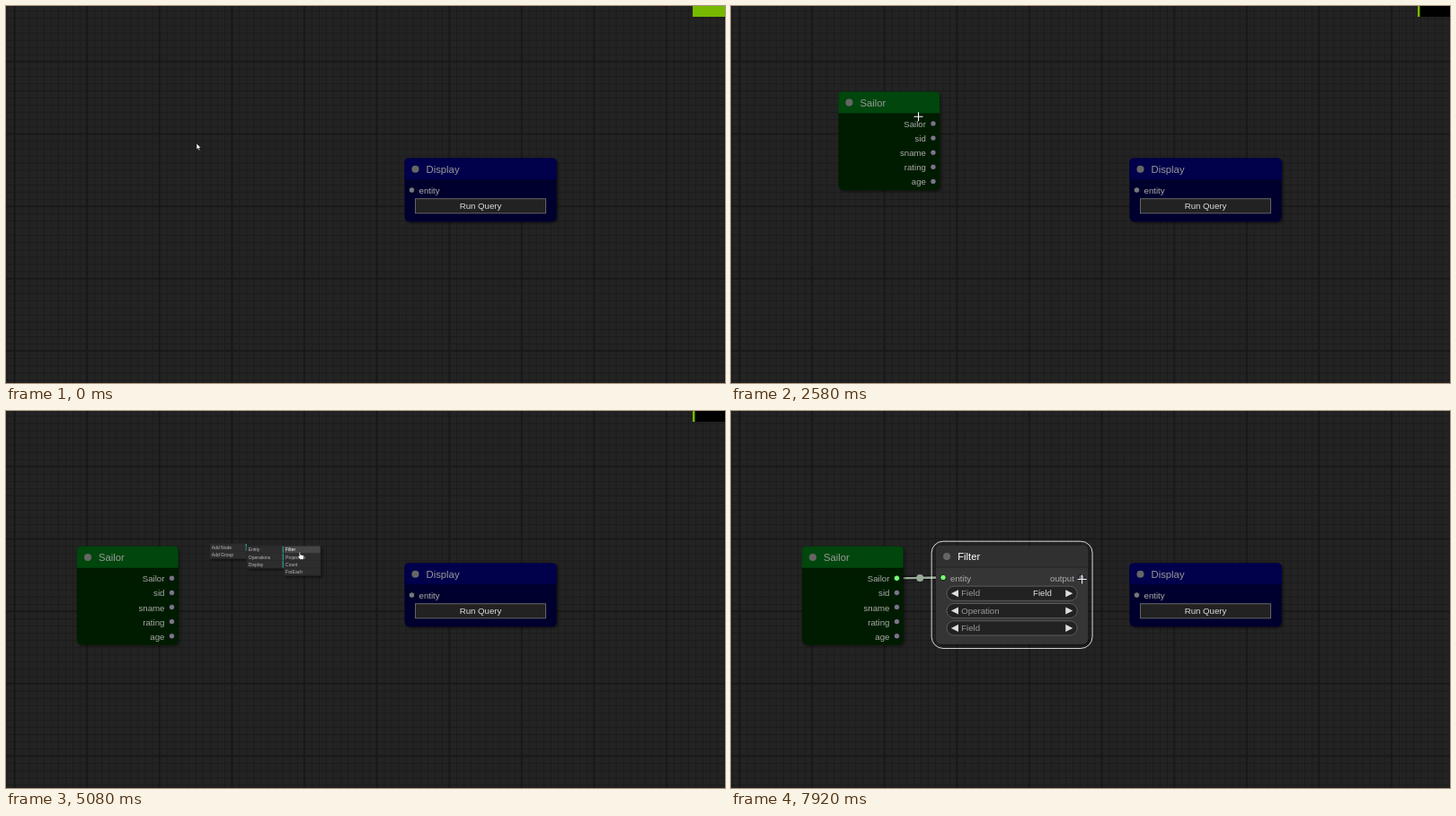
Write an HTML page that moves like this. It is 800x420 px and loops after 8000 ms.

```html
<!DOCTYPE html>
<html lang="en">
<head>
<meta charset="utf-8">
<title>Node editor</title>
<style>
  html, body { margin: 0; width: 100%; height: 100%; overflow: hidden; background: #232223; }
  svg { display: block; width: 800px; height: 420px; }
  text { font-family: "Liberation Sans", Arial, sans-serif; white-space: pre; }
</style>
</head>
<body>
<svg viewBox="0 0 800 420">
  <defs>
    <pattern id="minor" x="9.5" y="61.8" width="8.06" height="8.06" patternUnits="userSpaceOnUse">
      <path d="M0 0H8.06M0 0V8.06" stroke="#1b1a1b" stroke-width="1.6"/>
    </pattern>
    <pattern id="major" x="-30.8" y="21.5" width="80.6" height="80.6" patternUnits="userSpaceOnUse">
      <path d="M0 40.3H80.6M40.3 0V80.6" stroke="#171617" stroke-width="1.7"/>
    </pattern>
    <filter id="shadow" x="-10%" y="-10%" width="120%" height="120%">
      <feDropShadow dx="2" dy="2" stdDeviation="1.5" flood-color="#000" flood-opacity=".5"/>
    </filter>
  </defs>
  <rect width="800" height="420" fill="#242324"/>
  <rect width="800" height="420" fill="url(#minor)"/>
  <rect width="800" height="420" fill="url(#major)"/>
  <g id="scene"></g>
</svg>
<script>
const LOOP = 8000, FPS = 12, SCALE = 0.806, TITLE = 30, SLOT = 20;
const scene = document.getElementById('scene');

// Cursor path: [ms, x, y]
const cursorPath = [
  [0, 212, 153], [500, 121, 120], [750, 122, 121], [1000, 129, 123], [1250, 145, 122],
  [1500, 162, 123], [1670, 163, 123], [2420, 209, 123], [2580, 209, 123],
  [2830, 177.5, 137.7], [3250, 138, 191], [3330, 137, 193], [3420, 137, 193],
  [4000, 231.5, 152], [4250, 234, 152], [4500, 262, 154], [4750, 285, 162],
  [5000, 325, 158], [5080, 327, 157], [5250, 319, 155.5], [5920, 319, 155.5],
  [6080, 316, 170.5], [6250, 315.5, 177.7], [6330, 315.5, 177.7], [6750, 186, 186],
  [6830, 187, 186], [7250, 236, 186], [7330, 238, 186], [7920, 391.5, 187.5]
];

function along(path, t) {
  let i = 0;
  while (i < path.length - 2 && t > path[i + 1][0]) i++;
  const [a, b] = [path[i], path[i + 1]];
  const k = Math.min(1, Math.max(0, (t - a[0]) / (b[0] - a[0])));
  return { x: a[1] + (b[1] - a[1]) * k, y: a[2] + (b[2] - a[2]) * k };
}
const during = (t, from, to) => t >= from && t < to;
const inside = (p, x, y, w, h) => p.x >= x && p.x <= x + w && p.y >= y && p.y <= y + h;

const rect = (x, y, w, h, fill, extra = '') =>
  `<rect x="${x}" y="${y}" width="${w}" height="${h}" fill="${fill}" ${extra}/>`;
const label = (x, y, s, fill, size = 12, anchor = 'start') =>
  `<text x="${x}" y="${y}" fill="${fill}" font-size="${size}" text-anchor="${anchor}">${s}</text>`;
const dot = (x, y, r, fill, extra = '') => `<circle cx="${x}" cy="${y}" r="${r}" fill="${fill}" ${extra}/>`;

function slot(x, i, name, output, linked) {
  const y = (i + 0.7) * SLOT;
  return dot(x, y, 4, linked ? '#7f7' : '#778', 'stroke="#000"') +
    label(x + (output ? -10 : 10), y + 5, name, '#aaa', 12, output ? 'end' : 'start');
}

function button(w, y, name) {
  return rect(15, y, w - 30, 20, '#222', 'stroke="#777"') + label(w / 2, y + 14, name, '#ddd', 12, 'middle');
}

function combo(w, y, name, value) {
  return rect(15, y, w - 30, 20, '#222', 'rx="10" stroke="#666"') +
    `<path d="M31 ${y + 5}l-10 5l10 5zM${w - 31} ${y + 5}l10 5l-10 5z" fill="#ddd"/>` +
    label(35, y + 14, name, '#999') + label(w - 50, y + 14, value, '#ddd', 12, 'end');
}

function node(n, pos, selected, linked) {
  const { w, h } = n, full = h + TITLE;
  const shape = `M0 ${-TITLE + 6}q0-6 6-6H${w - 6}q6 0 6 6V${h - 8}q0 8-8 8H8q-8 0-8-8z`;
  const cap = `M0 0V${-TITLE + 6}q0-6 6-6H${w - 6}q6 0 6 6V0z`;
  let s = `<path d="${shape}" fill="${n.body}" filter="url(#shadow)"/><path d="${cap}" fill="${n.head}"/>`;
  s += rect(0, -1, w, 2, '#000', 'opacity=".2"');
  if (selected) s += rect(-6, -TITLE - 6, w + 12, full + 12, 'none', 'rx="16" stroke="#fff" stroke-width="1.2" opacity=".85"');
  s += dot(15, -15, 5, '#666') + label(30, -10, n.title, selected ? '#fff' : '#999', 14);
  s += (n.inputs || []).map((name, i) => slot(10, i, name, false, linked && !i)).join('');
  s += (n.outputs || []).map((name, i) => slot(w - 9, i, name, true, linked && !i && !n.inputs)).join('');
  return `<g transform="translate(${pos.x} ${pos.y}) scale(${SCALE})">${s}${n.widgets || ''}</g>`;
}

const sailor = {
  title: 'Sailor', w: 140, h: 106, head: '#00460d', body: '#001f05',
  outputs: ['Sailor', 'sid', 'sname', 'rating', 'age']
};
const display = {
  title: 'Display', w: 210, h: 58, head: '#00004b', body: '#00002f',
  inputs: ['entity'], widgets: button(210, 26, 'Run Query')
};
const filter = {
  title: 'Filter', w: 210, h: 106, head: '#303030', body: '#353535',
  inputs: ['entity'], outputs: ['output'],
  widgets: combo(210, 26, 'Field', 'Field') + combo(210, 50, 'Operation', '') + combo(210, 74, 'Field', '')
};
const covers = (p, n, pos) =>
  inside(p, pos.x, pos.y - TITLE * SCALE, n.w * SCALE, (n.h + TITLE) * SCALE);

const MENU_W = 41.5, ROW = 8.2;
const menuHeight = items => items.length * ROW + 1;
function menu(x, y, items, nested, p) {
  const rows = items.map((name, i) => {
    const top = y + 0.5 + i * ROW;
    const hot = inside(p, x, top, MENU_W - 0.5, ROW - 0.1);
    return rect(x + 0.7, top + 0.3, MENU_W - 1.4, ROW - 0.6, hot ? '#454545' : '#2d2d2d') +
      (i < nested ? rect(x + MENU_W - 1.3, top + 0.3, 1.2, ROW - 0.6, '#2fb5a8') : '') +
      label(x + 2.3, top + 5.9, name, hot ? '#fff' : '#bbb', 5);
  }).join('');
  return rect(x, y, MENU_W, menuHeight(items), '#262626', 'filter="url(#shadow)"') + rows;
}

const rootItems = ['Add Node', 'Add Group'];
const kindItems = ['Entity', 'Operations', 'Display'];
const sessions = [
  { x: 114.4, y: 115.2, open: 670, kinds: 1250, leaves: 1900, close: 2580, items: ['Sailor', 'Boat', 'Reserve'] },
  { x: 226.5, y: 147.4, open: 4080, kinds: 4500, leaves: 4830, close: 5420, items: ['Filter', 'Projection', 'Count', 'ForEach'] }
];

function menus(t, p) {
  const m = sessions.find(s => during(t, s.open, s.close));
  if (!m) return '';
  let s = menu(m.x, m.y, rootItems, 1, p);
  if (t >= m.kinds) s += menu(m.x + 41, m.y + 2.5, kindItems, 3, p);
  if (t >= m.leaves) s += menu(m.x + 82.3, m.y + 2.5, m.items, 0, p);
  return s;
}

function link(a, b, color) {
  const c = Math.hypot(b.x - a.x, b.y - a.y) / 4;
  const d = `M${a.x} ${a.y}C${a.x + c} ${a.y} ${b.x - c} ${b.y} ${b.x} ${b.y}`;
  return `<path d="${d}" fill="none" stroke="#000" stroke-opacity=".5" stroke-width="5"/>` +
    `<path d="${d}" fill="none" stroke="${color}" stroke-width="2.4"/>`;
}

const cursors = {
  arrow: '<path d="M0 0V7l1.6-1.5 1.2 2.6 1.2-.6-1.2-2.4H5z" fill="#fff" stroke="#000" stroke-width=".5"/>',
  cross: '<path d="M-5 0H5M0-5V5" stroke="#000" stroke-opacity=".4" stroke-width="2"/><path d="M-5 0H5M0-5V5" stroke="#fff" stroke-width="1.1"/>',
  hand: '<path d="M-.7 5V.4q.7-.9 1.4 0V3l3.2.7q.9.3.8 1.2L4.2 8.500H.6L-2.300 5.400q.1-1 1.600-.4z" fill="#fff" stroke="#000" stroke-width=".5"/>'
};

function toast(t) {
  if (t >= 6000) return '';
  const green = t < 5420 ? 36 - 33.5 * Math.min(1, Math.max(0, t / 330)) : 2.5 + 33.5 * Math.min(1, (t - 5420) / 330);
  return rect(764, 0, 36, 12, '#000') + rect(764, 0, green, 12, '#76b900');
}

function draw(t) {
  const p = along(cursorPath, t);
  const sailorPos = along([[2830, 119.4, 119.7], [3250, 79.9, 173], [3330, 78.9, 175]], t);
  const filterPos = along([[5920, 231.5, 152], [6080, 228.5, 167], [6250, 228, 174.2]], t);
  const displayPos = { x: 443.4, y: 193.8 };
  const hasSailor = t >= 2580, hasFilter = t >= 5420, linked = t >= 7250;
  const from = { x: sailorPos.x + 131 * SCALE, y: sailorPos.y + 14 * SCALE };
  const to = { x: filterPos.x + 10 * SCALE, y: filterPos.y + 14 * SCALE };

  let s = '';
  if (linked) s += link(from, to, '#9a9') + dot((from.x + to.x) / 2, (from.y + to.y) / 2, 4, '#9a9');
  s += node(display, displayPos, false, false);
  if (hasSailor) s += node(sailor, sailorPos, during(t, 2830, 3830), linked);
  if (hasFilter) s += node(filter, filterPos, t >= 5990, linked);
  if (during(t, 6830, 7250)) s += link(from, p, '#afa') + dot(p.x, p.y, 3.2, '#afa');
  s += menus(t, p) + toast(t);

  const onMenu = sessions.some(m => during(t, m.open, m.close) && inside(p, m.x, m.y, 124, 36));
  const onNode = covers(p, display, displayPos) ||
    hasSailor && covers(p, sailor, sailorPos) || hasFilter && covers(p, filter, filterPos);
  const kind = onMenu ? 'hand' : onNode ? 'cross' : 'arrow';
  return s + `<g transform="translate(${p.x} ${p.y})">${cursors[kind]}</g>`;
}

let shown = -1;
function tick(now) {
  const step = Math.floor((now % LOOP + 5) * FPS / 1000) % (LOOP * FPS / 1000);
  if (step !== shown) scene.innerHTML = draw(step * 1000 / FPS);
  shown = step;
  requestAnimationFrame(tick);
}
tick(0);
</script>
</body>
</html>
```
